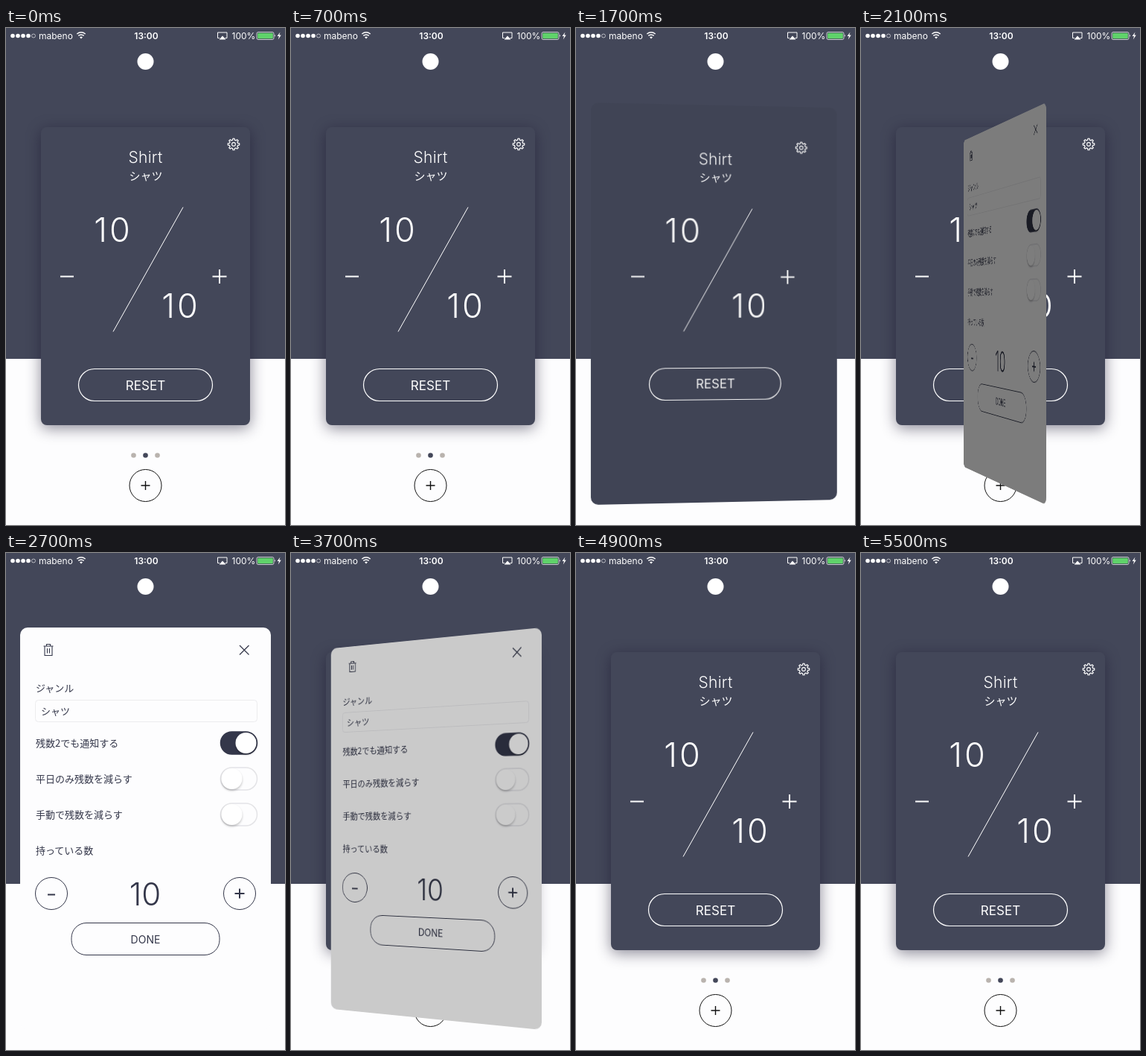
These frames come from a looping animation (375 by 667 pixels, 5.6 s). An HTML page:

```html
<!DOCTYPE html>
<html lang="ja">
<head>
<meta charset="utf-8">
<title>Card flip</title>
<style>
  html, body { margin: 0; width: 100%; height: 100%; overflow: hidden; background: #fdfdfe; }
  svg, #flip { position: absolute; left: 0; top: 0; width: 375px; height: 667px; display: block; }
  #flip { transform-origin: 187.5px 370px; }
  text { font-family: Inter, "Noto Sans CJK JP", "Noto Sans CJK", sans-serif; }
  .jp { font-family: "Noto Sans CJK JP", "Noto Sans CJK", sans-serif; font-weight: 300; }
  .mid { text-anchor: middle; }
  .line { fill: none; stroke: #fff; }
  .ink { fill: none; stroke: #34374a; }
  .shadow { fill: #16122c; filter: blur(10px); }
</style>
</head>
<body>
<svg viewBox="0 0 375 667">
  <defs>
    <g id="face">
      <path class="gear line" stroke-width="1.2" stroke-linejoin="round" transform="translate(306 156)"/>
      <circle class="line" cx="306" cy="156" r="2.4" stroke-width="1.1"/>
      <g fill="#fff">
        <text class="mid" x="187.5" y="181" font-size="21" font-weight="300" letter-spacing=".3">Shirt</text>
        <text class="jp mid" x="188" y="204" font-size="15">シャツ</text>
        <g font-size="45" font-weight="300" letter-spacing="3">
          <text class="mid" x="144" y="287">10</text>
          <text class="mid" x="235" y="389">10</text>
        </g>
        <text class="mid" x="187.5" y="485.5" font-size="17">RESET</text>
      </g>
      <path class="line" d="M144 407.5L238 240.500" stroke-width="1"/>
      <path class="line" d="M73 333.500H91M277.500 333.500H296.500M287 324V343" stroke-width="2"/>
      <rect class="line" x="97.500" y="457.500" width="180" height="43" rx="21.500" stroke-width="1.2"/>
    </g>
  </defs>

  <rect width="375" height="667" fill="#fdfdfe"/>
  <rect width="375" height="444" fill="#434759"/>

  <g fill="#fff">
    <circle cx="9" cy="10.500" r="2.800"/><circle cx="16" cy="10.500" r="2.800"/>
    <circle cx="23" cy="10.500" r="2.800"/><circle cx="30" cy="10.500" r="2.800"/>
    <circle class="line" cx="37" cy="10.500" r="2.500" stroke-width=".6"/>
    <text x="44" y="14.500" font-size="12">mabeno</text>
    <text class="mid" x="188.500" y="14.500" font-size="12" font-weight="600">13:00</text>
    <text x="303.500" y="14.500" font-size="12">100%</text>
    <path d="M101 14.500l-2-2.300q2-1.600 4 0z"/>
    <path d="M286.500 15.500l4.500-5 4.500 5z"/>
    <path d="M361 8.500q1.800 1.800 0 3.600z"/>
    <path d="M368.500 5.500l-4 5.500h2.500l-1.200 4.500 4-6h-2.500z"/>
    <circle cx="187.500" cy="45" r="11"/>
  </g>
  <path class="line" d="M97.300 10.400q3.700-3 7.400 0M95.300 8q5.700-4.400 11.400 0" stroke-width="1.500"/>
  <path class="line" d="M287 13.500H284.500V6H297V13.500H294.500"/>
  <rect class="line" x="337" y="5.500" width="23" height="10" rx="2" stroke-width=".7"/>
  <rect x="338.200" y="6.700" width="20.600" height="7.600" rx="1" fill="#5fd26a"/>

  <circle cx="171.500" cy="573.500" r="3.300" fill="#b9b3ae"/>
  <circle cx="187.500" cy="573.500" r="3.300" fill="#434759"/>
  <circle cx="203.500" cy="573.500" r="3.300" fill="#b9b3ae"/>
  <circle cx="187.500" cy="614" r="21.500" fill="none" stroke="#111"/>
  <path d="M181.500 614H193.500M187.500 608V620" stroke="#111" stroke-width="1.400"/>

  <g id="resting">
    <rect class="shadow" x="47" y="137" width="281" height="400" rx="8" opacity=".5"/>
    <rect x="47" y="133" width="281" height="400" rx="8" fill="#434759"/>
    <use href="#face"/>
  </g>
</svg>

<div id="flip">
  <svg id="front" viewBox="0 0 375 667">
    <rect id="glow" class="shadow"/>
    <rect id="panel" fill="#434759"/>
    <use href="#face"/>
    <rect class="shade" x="19" y="100" width="337" height="540" rx="10"/>
  </svg>
  <svg id="back" viewBox="0 0 375 667">
    <rect x="19" y="100" width="337" height="540" rx="10" fill="#fdfdfe"/>
    <path class="ink" d="M50.500 125H63.500M54.500 125V122.500H59.500V125M52 125V137.500H62V125M55.500 128V134.500M58.500 128V134.500" stroke-width="1.100"/>
    <path class="ink" d="M314 124L326.500 136.500M326.500 124L314 136.500" stroke-width="1.200"/>
    <rect x="39.500" y="197.500" width="298" height="29" rx="4" fill="none" stroke="#ececee"/>
    <g id="labels" class="jp" fill="#34374a" font-size="13"></g>
    <g id="switches"></g>
    <circle class="ink" cx="61" cy="457" r="21.500"/>
    <circle class="ink" cx="314" cy="457" r="21.500"/>
    <path class="ink" d="M56 458.500H66M307.500 457H320.500M314 450.500V463.500" stroke-width="2"/>
    <rect class="ink" x="88" y="496.500" width="199" height="43" rx="20"/>
    <g class="mid" fill="#34374a">
      <text x="187" y="472.500" font-size="42" font-weight="300">10</text>
      <text x="187.500" y="523.500" font-size="14">DONE</text>
    </g>
    <rect class="shade" x="19" y="100" width="337" height="540" rx="10"/>
  </svg>
</div>

<script>
const $ = id => document.getElementById(id);
const LOOP = 5600, STEP = 100, HALF_WIDTH = 168.5;

function gearPath(teeth, inner, outer) {
  const points = [];
  for (let i = 0; i < teeth; i++) {
    for (const [offset, r] of [[-.3, inner], [-.17, outer], [.17, outer], [.3, inner]]) {
      const a = (i + offset) / teeth * 2 * Math.PI;
      points.push((r * Math.sin(a)).toFixed(2) + ' ' + (-r * Math.cos(a)).toFixed(2));
    }
  }
  return 'M' + points.join('L') + 'Z';
}
document.querySelector('.gear').setAttribute('d', gearPath(8, 5.8, 7.8));

$('labels').innerHTML = [
  [40, 181, 'ジャンル'], [47, 212, 'シャツ'], [40, 255, '残数2でも通知する'],
  [40, 303, '平日のみ残数を減らす'], [40, 351, '手動で残数を減らす'], [40, 399, '持っている数']
].map(([x, y, label]) => `<text class="jp" x="${x}" y="${y + 4.7}">${label}</text>`).join('');

$('switches').innerHTML = [[255, true], [303, false], [351, false]].map(([y, on]) => {
  const knob = on ? 322.5 : 303.5;
  return `<rect x="288.5" y="${y - 15}" width="49" height="30" rx="15"
      fill="${on ? '#34374a' : '#fdfdfe'}" stroke="${on ? '#34374a' : '#e4e4e7'}" stroke-width="1.5"/>
    <circle cx="${knob}" cy="${y + 2}" r="14" opacity=".22" style="filter:blur(1.5px)"/>
    <circle cx="${knob}" cy="${y}" r="14" fill="#fff"/>`;
}).join('');

function ease(t, start, duration) {
  const x = Math.min(1, Math.max(0, (t - start) / duration));
  return x * x * (3 - 2 * x);
}

function setBox(el, x, y, width, height, rx) {
  for (const [key, value] of Object.entries({ x, y, width, height, rx })) el.setAttribute(key, value);
}

function draw(t) {
  const grow = ease(t, 1036, 400) - ease(t, 4450, 400);
  const turn = 180 * (ease(t, 1607, 850) - ease(t, 3490, 850));
  const mix = (a, b) => a + (b - a) * grow;

  const box = [mix(47, 19), mix(133, 100), mix(281, 337), mix(400, 540), mix(8, 10)];
  setBox($('panel'), ...box);
  box[1] += 4;
  setBox($('glow'), ...box);
  $('glow').style.opacity = .5 * (1 - grow);

  const showBack = turn > 90;
  const angle = showBack ? turn - 180 : turn;
  const depth = HALF_WIDTH * Math.abs(Math.sin(angle * Math.PI / 180));
  $('flip').style.transform = angle
    ? `perspective(1334px) translateZ(${-depth}px) rotateY(${angle}deg)` : 'none';
  $('front').style.display = showBack ? 'none' : 'block';
  $('back').style.display = showBack ? 'block' : 'none';
  $('resting').style.display = turn > 0 ? 'inline' : 'none';
  for (const shade of document.querySelectorAll('.shade')) {
    shade.style.opacity = .67 * Math.abs(angle) / 90;
  }
}

const startTime = performance.now();
function tick() {
  const t = (performance.now() - startTime) % LOOP;
  draw(Math.floor(t / STEP) * STEP);
  requestAnimationFrame(tick);
}
tick();
</script>
</body>
</html>
```
